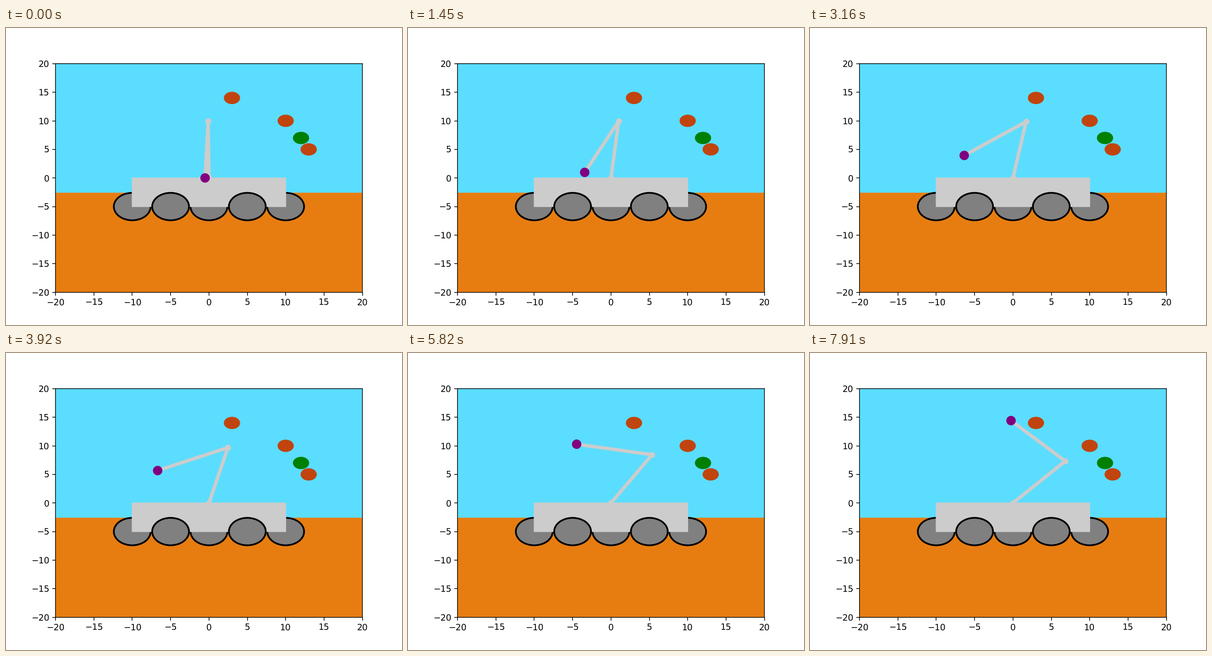
A matplotlib script for the animation above (8000 ms loop, 864x648 px).

```python
import numpy as np
import matplotlib.pyplot as plt
from matplotlib.animation import FuncAnimation
from matplotlib.patches import Circle, Ellipse, Rectangle

LOOP = 8000
TICK = 40
LINK = 10

SKY, GROUND, ROCK = "#5bddff", "#e77d11", "#c1440e"
METAL = "#cccccc"

# Key poses of the arm: step, shoulder angle, elbow bend (degrees)
POSES = [(0, 90.6, 177.1), (9, 84.4, 167.3), (16, 84.2, 159.5),
         (34, 80.1, 136.1), (51, 70.7, 118.9), (62, 57.6, 111.8),
         (70, 50.9, 104.2), (84, 47.1, 87.8)]

plt.rcParams["path.snap"] = False
plt.rcParams["text.hinting"] = "none"

fig, ax = plt.subplots(figsize=(6.4, 4.8), dpi=135)
ax.set_xlim(-20, 20)
ax.set_ylim(-20, 20)


def disc(x, y, color):
    ax.add_patch(Circle((x, y), 1, color=color))


def box(x, y, w, h, color):
    ax.add_patch(Rectangle((x, y), w, h, color=color))


def wheel(x):
    ax.add_patch(Circle((x, -5), 2.4, fc="gray", ec="black", lw=2))


box(-20, -20, 40, 40, GROUND)
box(-20, -2.5, 40, 22.5, SKY)
for x in (-10, 0, 10):
    wheel(x)
box(-10, -5, 20, 5, METAL)
for x in (-5, 5):
    wheel(x)
for x, y in ((3, 14), (10, 10), (13, 5)):
    disc(x, y, ROCK)
disc(12, 7, "green")

arm, = ax.plot([], [], "o-", color=METAL, lw=4)

# Round on screen: 11 pt across, converted to axis units
size = 11 / 72 * 40 / (fig.get_size_inches() * (0.775, 0.77))
hand = ax.add_patch(Ellipse((0, 0), *size, color="purple", lw=0, zorder=3))


def step_at(t):
    """Steps come in pairs, held for 60 ms and 130 ms in turn."""
    if t < 60:
        return 0
    pair, rest = divmod(t - 60, 190)
    return 1 + 2 * pair + (rest >= 60)


def joints(step):
    steps, shoulder, bend = np.transpose(POSES)
    a = np.radians(np.interp(step, steps, shoulder))
    b = a + np.radians(np.interp(step, steps, bend))
    elbow = LINK * np.array([np.cos(a), np.sin(a)])
    tip = elbow + LINK * np.array([np.cos(b), np.sin(b)])
    return np.array([(0, 0), elbow, tip])


def update(n):
    pts = joints(step_at(n * TICK + 30))
    arm.set_data(pts[:, 0], pts[:, 1])
    hand.set_center(pts[2])
    return arm, hand


anim = FuncAnimation(fig, update, frames=LOOP // TICK, interval=TICK,
                     repeat=True, repeat_delay=0)
plt.show()
```
